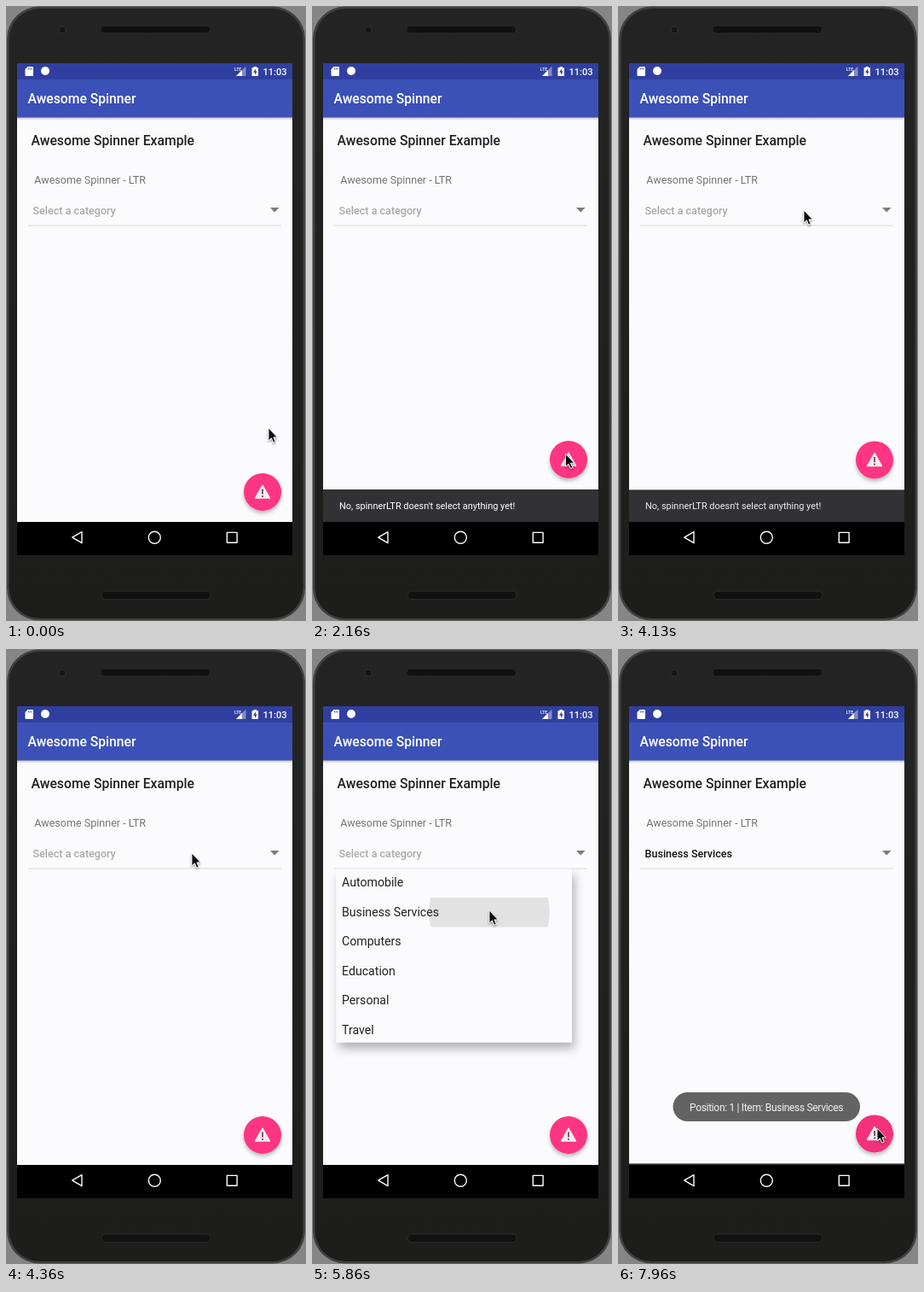
Animation, 352 px wide and 720 px high, one loop 8000 ms. Source, as an HTML page:

```html
<!DOCTYPE html>
<html lang="en">
<head>
<meta charset="utf-8">
<title>Awesome Spinner</title>
<style>
  html, body { margin: 0; width: 100%; height: 100%; overflow: hidden; background: #858585; }
  svg { display: block; width: 100%; height: 100%; }
  text { font-family: Roboto, "Noto Sans", sans-serif; white-space: pre; }
  .medium { font-weight: 500; }
</style>
</head>
<body>
<svg viewBox="0 0 352 720" xmlns="http://www.w3.org/2000/svg">
  <defs>
    <linearGradient id="shell" x1="0" y1="0" x2="0" y2="1">
      <stop offset="0" stop-color="#242424"/>
      <stop offset="1" stop-color="#1d1d1c"/>
    </linearGradient>
    <linearGradient id="barShade" x1="0" y1="0" x2="0" y2="1">
      <stop offset="0" stop-color="#000" stop-opacity=".25"/>
      <stop offset="1" stop-color="#000" stop-opacity="0"/>
    </linearGradient>
    <filter id="fabShade" x="-50%" y="-50%" width="200%" height="200%">
      <feDropShadow dx="0" dy="3" stdDeviation="2.2" flood-opacity=".26"/>
    </filter>
    <filter id="listShade" x="-20%" y="-20%" width="150%" height="150%">
      <feDropShadow dx="3" dy="7" stdDeviation="6" flood-opacity=".3"/>
    </filter>
    <filter id="cursorShade" x="-80%" y="-50%" width="260%" height="220%">
      <feDropShadow dx="0" dy="1.4" stdDeviation="1.1" flood-opacity=".45"/>
    </filter>
    <clipPath id="page"><rect x="13" y="67" width="323" height="537"/></clipPath>
    <clipPath id="field"><rect x="26" y="225" width="297" height="26.5" rx="2"/></clipPath>
    <clipPath id="row"><rect x="28.500" y="291" width="276.500" height="34.400"/></clipPath>
    <clipPath id="reveal"><rect id="revealBox" x="8" y="257" width="320" height="240"/></clipPath>
  </defs>

  <!-- phone -->
  <rect width="352" height="720" fill="#858585"/>
  <rect x="1" y=".5" width="350" height="719" rx="38" fill="#404040"/>
  <rect x="3.500" y="3" width="345" height="714" rx="36" fill="url(#shell)"/>
  <rect x="111" y="23" width="128.500" height="9" rx="4.500" fill="#111" stroke="#2c2c2c"/>
  <rect x="112" y="685" width="128" height="9.500" rx="4.700" fill="#111" stroke="#2c2c2c"/>
  <circle cx="66" cy="28" r="4" fill="#151515" stroke="#303030"/>

  <!-- screen -->
  <rect x="13" y="67" width="323" height="576" fill="#000"/>
  <rect x="13" y="67" width="323" height="537" fill="#fbfbfd"/>
  <rect x="13" y="130" width="323" height="4" fill="url(#barShade)"/>
  <rect x="13" y="67" width="323" height="19" fill="#303f9f"/>
  <rect x="13" y="86" width="323" height="44.500" fill="#3b51b8"/>

  <!-- status icons -->
  <g fill="#fff">
    <path d="M25.500 71H31a1 1 0 0 1 1 1V81a1 1 0 0 1-1 1H23.500a1 1 0 0 1-1-1V74Z"/>
    <path d="M26.300 72.500v2M28.200 72.500v2M30.100 72.500v2" stroke="#303f9f" stroke-width=".9"/>
    <circle cx="46" cy="76" r="5"/>
    <path d="M270 82L281.500 70.500V82Z" opacity=".4"/>
    <path d="M270 82L277 75V82Z"/>
    <text x="268" y="75.500" font-size="5" class="medium">LTE</text>
    <path d="M288.500 72.200H290.500V71H294V72.200H296V82H288.500Z"/>
    <path d="M293 73.500L290 77.800H292V80.800L294.700 76.500H293Z" fill="#303f9f"/>
    <text x="301.500" y="80.500" font-size="11" class="medium">11:03</text>
    <text x="25.500" y="114" font-size="15.700" class="medium">Awesome Spinner</text>
  </g>

  <text x="29.500" y="163" font-size="15.720" class="medium" fill="#212121">Awesome Spinner Example</text>
  <text x="33.300" y="208" font-size="12.550" fill="#757575">Awesome Spinner - LTR</text>
  <circle id="fieldRipple" cx="208" cy="239" fill="#eeeeec" clip-path="url(#field)"/>
  <text id="choice" x="31.500" y="243.500" font-size="12.550" class="medium"></text>
  <path d="M310 236H320.500L315.200 241.500Z" fill="#7c7c7c"/>
  <path d="M26 257H323" stroke="#dadada"/>

  <!-- drop-down list -->
  <g id="list" clip-path="url(#reveal)">
    <rect x="28.500" y="257.500" width="276.500" height="203" fill="#fbfbfd" filter="url(#listShade)"/>
    <circle id="rowRipple" cx="208" cy="308" fill="#e2e2e2" clip-path="url(#row)"/>
    <g id="items" font-size="14.150" fill="#212121"></g>
  </g>

  <g clip-path="url(#page)">
    <g id="snack">
      <rect x="13" y="566" width="323" height="39" fill="#323234"/>
      <text id="snackText" x="32" y="589" font-size="10.950" fill="#fff">No, spinnerLTR doesn't select anything yet!</text>
    </g>
    <g id="fab">
      <circle cx="301" cy="569" r="22" fill="#fe3582" filter="url(#fabShade)"/>
      <circle id="press" cx="301" cy="569" r="22" fill="#400010"/>
      <path d="M301 561.300L309.300 576H292.700Z" fill="#f1eeef" stroke="#f1eeef" stroke-width="1.600" stroke-linejoin="round"/>
      <path d="M301 565.500V571.500M301 573V575" stroke="#7a4658" stroke-width="1.800"/>
    </g>
  </g>

  <g id="toast">
    <rect x="64.500" y="519" width="219.500" height="34" rx="17" fill="#636363"/>
    <text x="84" y="541" font-size="12" letter-spacing="-.32" fill="#f2f2f2">Position: 1 | Item: Business Services</text>
  </g>

  <!-- navigation -->
  <g fill="none" stroke="#fff" stroke-width="1.400" stroke-linejoin="round">
    <path d="M77.700 622.200L89 615.700V628.700Z"/>
    <circle cx="174.300" cy="622.200" r="7"/>
    <rect x="259.300" y="616.400" width="11.800" height="11.800"/>
  </g>

  <g id="cursor">
    <path d="M0 0V15L3.400 11.800L5.700 17.200L8.200 16.100L5.900 10.900H10.300Z" fill="#080808" stroke="#fff" stroke-width=".9" stroke-linejoin="round" filter="url(#cursorShade)"/>
  </g>
</svg>
<script>
  const LOOP = 8000;
  const SNACK_HEIGHT = 38;
  const CATEGORIES = ["Automobile", "Business Services", "Computers", "Education", "Personal", "Travel"];
  // time, x, y of the pointer tip
  const POINTER = [
    [0, 308, 494], [30, 308, 494], [60, 308, 496], [430, 308, 496],
    [620, 311, 532], [830, 304, 562], [2100, 304, 562], [2260, 287, 463],
    [2500, 287, 463], [3030, 218, 239], [4900, 218, 239], [5100, 209, 259],
    [5430, 208, 306], [6290, 208, 306], [6360, 208, 345], [6560, 295, 525],
    [6830, 295, 525], [7100, 307, 564], [7600, 307, 564], [7630, 304, 562],
    [7900, 304, 562], [7930, 304, 561], [LOOP, 304, 561]
  ];

  const $ = id => document.getElementById(id);
  const el = Object.fromEntries(
    ["fieldRipple", "choice", "list", "revealBox", "rowRipple", "items", "snack",
     "snackText", "fab", "press", "toast", "cursor"].map(id => [id, $(id)]));
  const set = (node, name, value) => node.setAttribute(name, value);
  const span = (t, from, length) => Math.min(1, Math.max(0, (t - from) / length));
  const move = (node, x, y) => set(node, "transform", `translate(${x} ${y})`);

  // cubic-bezier(.4, 0, .2, 1)
  function standard(x) {
    let low = 0, high = 1;
    for (let i = 0; i < 20; i++) {
      const s = (low + high) / 2, r = 1 - s;
      if (1.2 * r * r * s + 0.6 * r * s * s + s ** 3 < x) low = s; else high = s;
    }
    return low * low * (3 - 2 * low);
  }

  function pointerAt(t) {
    const i = POINTER.findIndex(p => p[0] > t);
    const [t0, x0, y0] = POINTER[i - 1], [t1, x1, y1] = POINTER[i];
    const k = (t - t0) / (t1 - t0);
    return [x0 + (x1 - x0) * k, y0 + (y1 - y0) * k];
  }

  const pressed = (t, at) => span(t, at, 60) * (1 - span(t, at + 300, 350));

  function ripple(node, t, start, speed, fadeFrom, fadeTime) {
    set(node, "r", Math.max(0, t - start) * speed);
    set(node, "opacity", 1 - span(t, fadeFrom, fadeTime));
  }

  CATEGORIES.forEach((name, i) => {
    const item = document.createElementNS("http://www.w3.org/2000/svg", "text");
    set(item, "x", 35);
    set(item, "y", 278.45 + i * 34.45);
    item.textContent = name;
    el.items.append(item);
  });

  function draw(t) {
    const second = t >= 7930;
    const shown = second ? 7930 : 1121;
    const up = standard(span(t, shown, 250)) - (second ? 0 : standard(span(t, 4115, 245)));
    move(el.snack, 0, SNACK_HEIGHT * (1 - up));
    move(el.fab, 0, -SNACK_HEIGHT * up);
    set(el.snackText, "opacity", span(t, shown + 70, 180) * (second ? 1 : 1 - span(t, 4115, 180)));
    set(el.press, "opacity", 0.11 * Math.max(pressed(t, 1100), pressed(t, 7930)));

    ripple(el.fieldRipple, t, 4900, 0.215, 5150, 280);
    const open = standard(span(t, 4930, 160));
    set(el.list, "opacity", open * (1 - span(t, 5960, 130)));
    set(el.revealBox, "height", 240 * open);
    ripple(el.rowRipple, t, 5760, 0.7, 5960, 130);

    const picked = t >= 5960;
    el.choice.textContent = picked ? CATEGORIES[1] : "Select a category";
    set(el.choice, "fill", picked ? "#111" : "#a9a9a9");
    set(el.toast, "opacity", 1 - (1 - span(t, 6030, 500)) ** 2);
    move(el.cursor, ...pointerAt(t));
  }

  const begin = performance.now();
  function tick() {
    draw((performance.now() - begin) % LOOP);
    requestAnimationFrame(tick);
  }
  tick();
</script>
</body>
</html>
```
